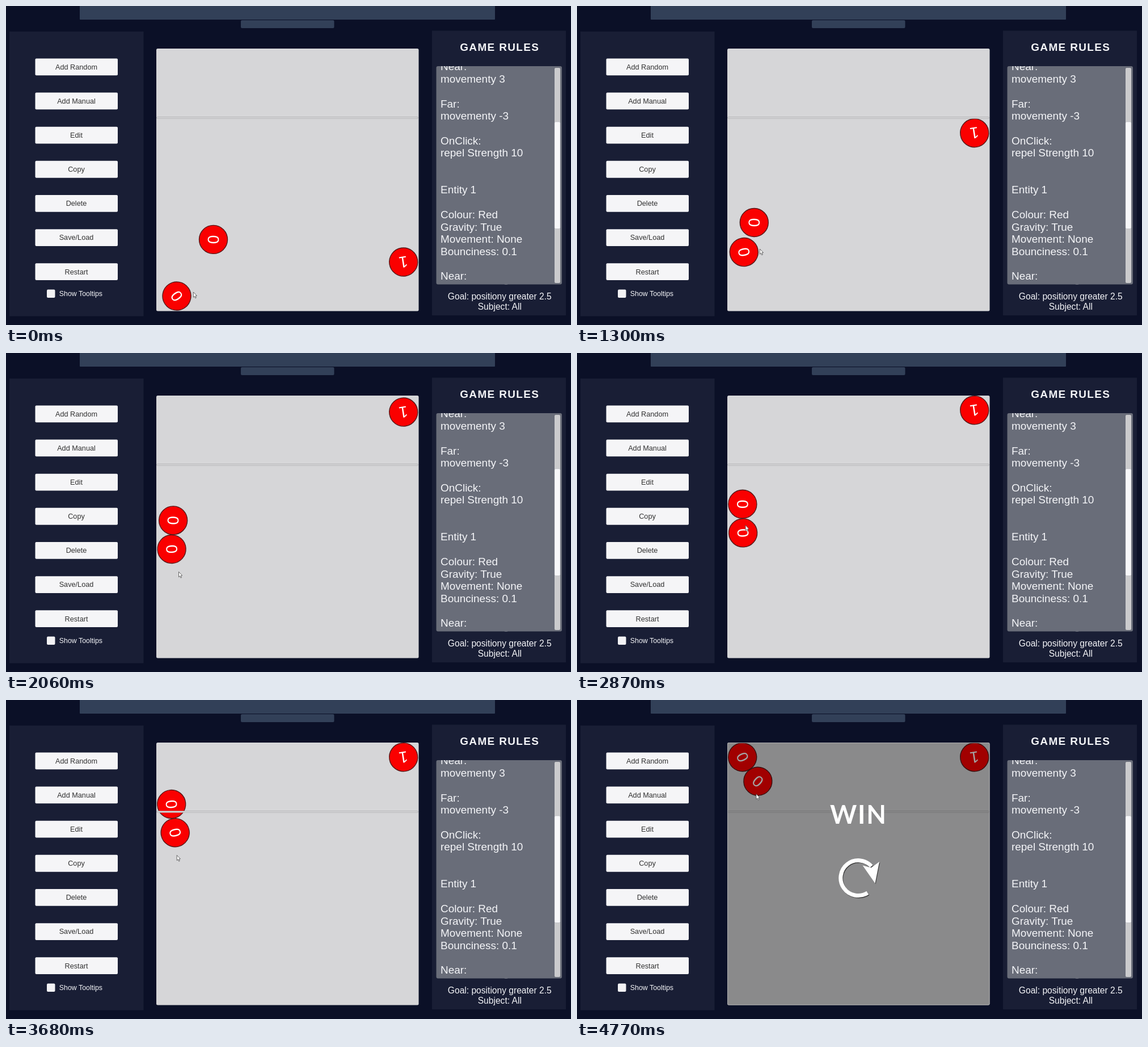
Recreate the animation shown at these times as an HTML page. Size 996x562 px, loop 4.87 s.

```html
<!DOCTYPE html>
<html lang="en">
<head>
<meta charset="utf-8">
<title>Game rules sandbox</title>
<style>
  html, body { margin: 0; width: 100%; height: 100%; overflow: hidden; background: #0b1027; }
  svg { display: block; width: 100%; height: 100%; font-family: "Liberation Sans", Arial, sans-serif; }
  .mid { text-anchor: middle; }
  .light { fill: #f4f5f8; }
  .panel { fill: #191e35; }
  .button rect { fill: #f5f5f7; }
  .button text { fill: #323232; font-size: 12.7px; text-anchor: middle; }
  .ball circle { fill: #fa0000; stroke: #581818; stroke-width: 1.4; }
  .ball text { fill: #fff; font-size: 28px; text-anchor: middle; }
  .win { font: bold 45px Lato, sans-serif; letter-spacing: 1.8px; }
</style>
</head>
<body>
<svg viewBox="0 0 996 562" preserveAspectRatio="none">
  <defs>
    <clipPath id="rulesClip"><rect x="759" y="106" width="208" height="384"/></clipPath>
    <g id="retry">
      <path d="M512.3 339.8A31 31 0 1 1 519 293" fill="none" stroke="currentColor" stroke-width="7"/>
      <path d="M533 285L525.5 323L503.5 291.5L518.5 295.5Z" fill="currentColor"/>
    </g>
  </defs>

  <rect width="996" height="562" fill="#0b1027"/>
  <rect x="130" y="-4" width="732" height="28" rx="1" fill="#324058"/>
  <rect x="414" y="25" width="164.5" height="14" rx="2" fill="#324058"/>

  <rect class="panel" x="6" y="45" width="236.5" height="501.5"/>
  <g id="buttons"></g>
  <rect x="72" y="499.5" width="14.5" height="14.5" rx="2" fill="#f2f2f4"/>
  <text class="light" x="93.8" y="511.3" font-size="12.4">Show Tooltips</text>

  <rect class="panel" x="751" y="43.5" width="236" height="501.5"/>
  <text class="light mid" x="870.3" y="79.3" font-size="19" font-weight="bold" letter-spacing="1.35">GAME RULES</text>
  <rect x="758.5" y="106" width="221.5" height="384.5" rx="3" fill="#696d79"/>
  <g id="rules" class="light" font-size="18.95" clip-path="url(#rulesClip)"></g>
  <rect x="967" y="109" width="10" height="379" rx="2" fill="#cbcbcd"/>
  <rect x="967" y="204" width="10" height="188.5" rx="2" fill="#f7f7f9" stroke="#a9abb1" stroke-width=".5"/>
  <rect x="879" y="490" width="5" height="1" fill="#696d79"/>
  <text class="light mid" x="870.3" y="517" font-size="15.6">Goal: positiony greater 2.5</text>
  <text class="light mid" x="870.3" y="535" font-size="15.6">Subject: All</text>

  <rect x="265" y="75" width="462.5" height="462.5" rx="2.5" fill="#d6d6d8"/>
  <g id="balls"></g>
  <rect x="265.5" y="195.6" width="461" height="2.6" rx="1.3" fill="#dadadc" stroke="#a2a2a4" stroke-width=".7"/>

  <g id="win">
    <rect x="265" y="75" width="462.5" height="462.5" rx="2.5" fill-opacity=".355"/>
    <rect x="265.5" y="75.5" width="461.5" height="461.5" rx="2" fill="none" stroke="#b5b5b7" stroke-width=".8"/>
    <text class="win mid" x="496.3" y="218" fill="#fff">WIN</text>
    <use href="#retry" x="1" y="1.2" color="#3c3c3c"/>
    <use href="#retry" color="#fff"/>
  </g>
  <path id="cursor" d="M0 0V9.2L2 7.4L3.5 10.7L5 10L3.6 6.8L6.2 6.5Z" fill="#fff" stroke="#444" stroke-width=".8"/>
</svg>

<script>
const LOOP = 4870;
const WALL = 291.7, TOP = 100.7, CONTACT = 50.6;
const $ = id => document.getElementById(id);

function add(parent, tag, attrs = {}, text = "") {
  const el = document.createElementNS("http://www.w3.org/2000/svg", tag);
  for (const key in attrs) el.setAttribute(key, attrs[key]);
  el.textContent = text;
  return parent.appendChild(el);
}

["Add Random", "Add Manual", "Edit", "Copy", "Delete", "Save/Load", "Restart"].forEach((label, i) => {
  const g = add($("buttons"), "g", { class: "button", transform: `translate(51.5 ${92.4 + i * 60.15})` });
  add(g, "rect", { width: 145.5, height: 29.8, rx: 2 });
  add(g, "text", { x: 72.5, y: 19.3 }, label);
});

const rules = `Near:
movementy 3

Far:
movementy -3

OnClick:
repel Strength 10


Entity 1

Colour: Red
Gravity: True
Movement: None
Bounciness: 0.1

Near:`;
rules.split("\n").forEach((line, i) => add($("rules"), "text", { x: 766, y: 113.4 + i * 21.7 }, line));

function makeBall(label) {
  const g = add($("balls"), "g", { class: "ball" });
  add(g, "circle", { r: 25 });
  add(g, "text", { y: 9.7 }, label);
  return g;
}
const lower = makeBall("0"), upper = makeBall("0"), right = makeBall("1");

// Key moments shared by the pushed ball and the pointer
const beats = [0, 1300, 2060, 2870, 3680, 4080, 4770];
const lowerY = [511, 433.6, 345.5, 316.5, 232.5, 194.5, 143];
const cursorX = [330.3, 322.3, 304.5, 297, 301.3, 304, 316];
const cursorY = [504, 428, 385.5, 303, 272.5, 204, 165.5];

// Smooth curve through the beats, at rest at both ends
function curve(v, t) {
  const last = beats.length - 1;
  const i = Math.min(last, beats.findIndex(b => b > t) + last + 1) && Math.max(0, beats.filter(b => b <= t).length - 1);
  if (i >= last) return v[last];
  const slope = j => j > 0 && j < last ? (v[j + 1] - v[j - 1]) / (beats[j + 1] - beats[j - 1]) : 0;
  const span = beats[i + 1] - beats[i], u = (t - beats[i]) / span, w = 1 - u;
  return w * w * (1 + 2 * u) * v[i] + u * u * (3 - 2 * u) * v[i + 1]
    + span * u * w * (w * slope(i) - u * slope(i + 1));
}

// The picture refreshes in steps, slightly faster in the second part
function snap(t) {
  if (t < 290) return 0;
  const step = t < 2060 ? 152 : 134;
  return 2060 + step * Math.floor((t - 2060) / step);
}

const settle = (t, time) => Math.exp(-((t / time) ** 2));

function rightY(t) {
  const s = t / 1000, bounce = (s - 1.76) / 0.44;
  if (bounce > 0) return TOP + (bounce < 1 ? 4 * Math.sin(Math.PI * bounce) : 0);
  return Math.max(TOP, 451 - 265 * (Math.hypot(s, 0.556) - 0.556));
}

function place(el, x, y, angle = 0) {
  el.setAttribute("transform", `translate(${x} ${y}) rotate(${angle})`);
}

function draw(now) {
  const t = snap(now % LOOP), drift = settle(t, 1150);
  const lx = WALL + 9.3 * drift + 28 * Math.max(0, (t - 2060) / 2710) ** 2.8;
  const ux = WALL + 73.8 * drift;
  const y = curve(lowerY, t);
  // The lower ball rolls out sideways around the upper one
  const lean = Math.max(0, lx - ux);
  const gap = Math.sqrt(CONTACT ** 2 - lean ** 2) + 49 * settle(t, 700);

  place(lower, lx, y, 88 - 33 * drift - 1.7 * lean);
  place(upper, ux, Math.max(TOP, y - gap), 91 - 0.93 * lean);
  place(right, 700.7, rightY(t), 171);
  place($("cursor"), curve(cursorX, t), curve(cursorY, t));
  $("win").setAttribute("opacity", Math.min(1, Math.max(0, (t - 3850) / 150)));
}

let start;
function loop(now) {
  start ??= now;
  draw(now - start);
  requestAnimationFrame(loop);
}
draw(0);
requestAnimationFrame(loop);
</script>
</body>
</html>
```
